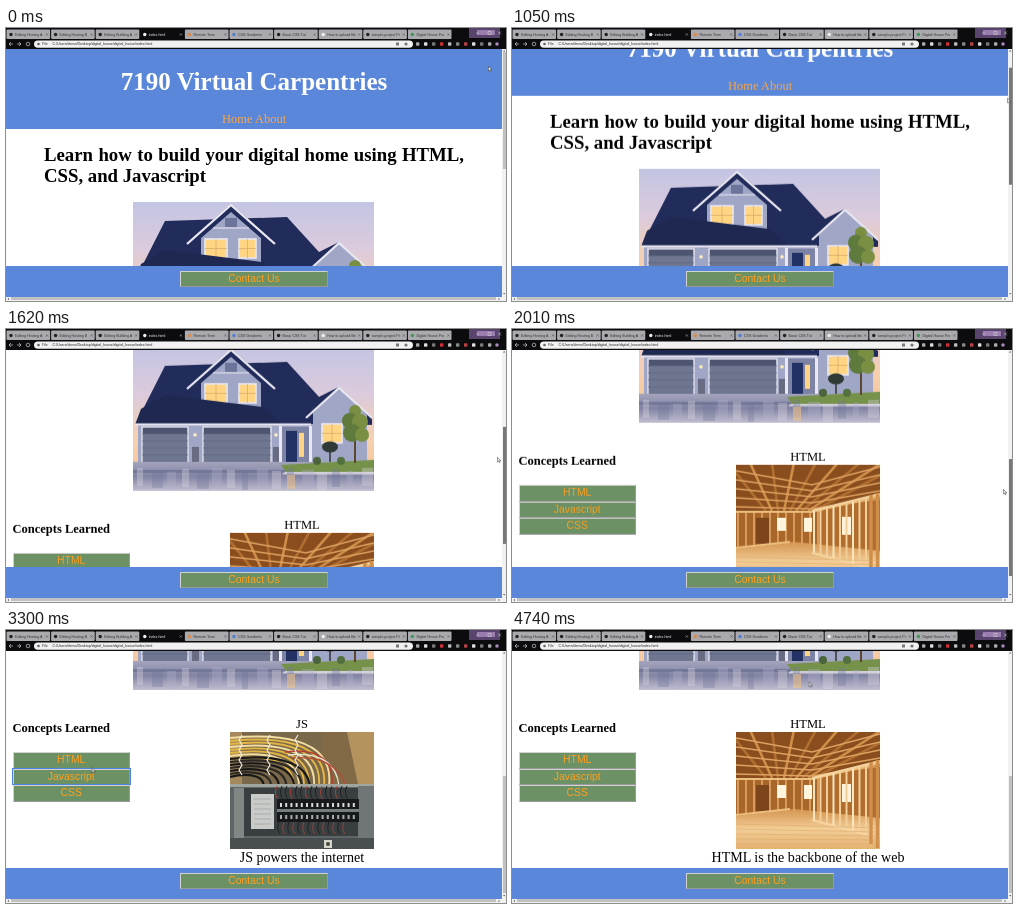
An HTML page for the animation above (4.77 s loop, 500 by 273 pixels).

```html
<!DOCTYPE html>
<html lang="en">
<head>
<meta charset="utf-8">
<title>Scrolling web page</title>
<style>
  html, body { margin: 0; width: 100%; height: 100%; overflow: hidden; background: #fff; }
  #stage { position: relative; width: 500px; height: 273px; overflow: hidden; background: #fff;
    font: 12.5px/1 "Liberation Serif", "Times New Roman", serif; color: #000; }
  #stage * { box-sizing: border-box; }
  #stage div, #stage svg, h1, h2, h3, p, button { position: absolute; margin: 0; }
  h1, h3, p { white-space: nowrap; line-height: 1; font-size: 12.5px; }
  #page { left: 0; top: .5px; width: 496px; height: 526px; }
  header { position: absolute; top: 0; width: 496px; height: 100px; background: #5b87da; }
  h1, nav { position: absolute; width: 100%; text-align: center; }
  h1 { top: 40px; font-size: 25px; color: #fff; }
  nav { top: 84.5px; color: #ffa53c; }
  h2 { left: 38px; top: 115px; width: 420px; font-size: 18.75px; line-height: 21.5px; text-align: justify; }
  h3 { left: 6.5px; top: 349.5px; }
  .panel { left: 196px; top: 345.5px; width: 200px; height: 150px; }
  .panel p { width: 100%; text-align: center; }
  .panel p:last-child { top: 132px; font-size: 14.06px; }
  .panel svg { left: 28px; top: 13.5px; }
  button { padding: .8px 0 0; background: #6b9164; color: #ffa020; border: 1.6px solid;
    border-color: #d2d2d2 #999 #999 #d2d2d2;
    font: 10.42px/1 "Liberation Sans", Arial, sans-serif; text-align: center; }
  #page button { left: 6.5px; width: 117.5px; height: 16.5px; }
  #ring { left: 6px; top: 395.5px; width: 118.5px; height: 17px; border: 1px solid #4b85dc; }
  footer { position: absolute; top: 237.5px; width: 496px; height: 31px; background: #5b87da; }
  footer button { left: 174px; top: 5.8px; width: 148px; height: 16px; }
  .track { background: #f1f1f1; }
  .track div { background: #c1c1c1; }
  #chrome { width: 500px; height: 21px; background: #0c0b0e;
    font: 3.6px/9px "Liberation Sans", Arial, sans-serif; white-space: nowrap; overflow: hidden; }
  #cursor { left: 0; top: 0; }
</style>
</head>
<body>
<div id="stage">
  <div id="page">
    <header><h1>7190 Virtual Carpentries</h1><nav>Home About</nav></header>
    <h2>Learn how to build your digital home using HTML, CSS, and Javascript</h2>
    <svg id="house" width="241" height="144" style="left:127px;top:173px"></svg>
    <h3>Concepts Learned</h3>
    <button style="top:379.5px">HTML</button>
    <button style="top:396px">Javascript</button>
    <button style="top:412.5px">CSS</button>
    <div id="ring"></div>
    <div class="panel" id="html"><p>HTML</p><svg width="144" height="117"></svg><p>HTML is the backbone of the web</p></div>
    <div class="panel" id="js"><p>JS</p><svg width="144" height="117"></svg><p>JS powers the internet</p></div>
  </div>
  <footer><button>Contact Us</button></footer>
  <div class="track" style="left:496px;top:21px;width:4px;height:252px">
    <div id="thumb" style="left:.5px;top:3.3px;width:3.5px;height:117px"></div>
  </div>
  <div class="track" style="left:0;top:268.5px;width:496px;height:4.5px">
    <div style="left:5px;top:.6px;width:485px;height:3.4px"></div>
  </div>
  <svg width="500" height="273" fill="#666"><path d="M3 269.8v2.4l-1.5-1.2ZM492.5 269.8v2.4l1.5-1.2ZM497 265h2.4l-1.2 1.5ZM497 23.5h2.4l-1.2-1.5Z"/></svg>
  <div id="chrome"></div>
  <svg id="cursor" width="6" height="8"><path d="M.4.4V5L1.5 4l.8 1.7.8-.4L2.4 3.6H3.8Z" fill="#fff" stroke="#222" stroke-width=".5"/></svg>
</div>
<script>
const LOOP = 4770;
const $ = q => document.querySelector(q);
const rep = (n, f) => Array.from({ length: n }, (_, i) => f(i)).join('');
const rect = (x, y, w, h, fill, more = '') =>
  `<rect x="${x}" y="${y}" width="${w}" height="${h}" fill="${fill}" ${more}/>`;
const poly = (points, fill) => `<polygon points="${points}" fill="${fill}"/>`;
const line = (d, color, width = 1) =>
  `<path d="${d}" fill="none" stroke="${color}" stroke-width="${width}"/>`;
const dot = (x, y, r, fill) => `<circle cx="${x}" cy="${y}" r="${r}" fill="${fill}"/>`;
const fade = (id, ...colors) => `<linearGradient id="${id}" x2="0" y2="1">` +
  colors.map((c, i) => `<stop offset="${i / (colors.length - 1)}" stop-color="${c}"/>`).join('') +
  '</linearGradient>';

function drawHouse() {
  const navy = '#222c5a', wall = '#a0a6c6', trim = '#e9e8f2', glow = '#ffd583';
  const pane = (x, y, w, h) => rect(x, y, w, h, glow, `stroke="${trim}" stroke-width="1.6"`) +
    line(`M${x + w / 2} ${y}v${h}M${x} ${y + h / 2}h${w}`, '#d6a96b', .7);
  const garage = (x, w) => rect(x, 80, w, 36, '#6f7690', `stroke="${trim}" stroke-width="1.3"`) +
    rect(x + 1, 81, w - 2, 6, '#4d546f') +
    rep(4, i => line(`M${x} ${87 + i * 7}h${w}`, '#5f6681', .7));
  return fade('sky', '#c3c5e4', '#dccbdc', '#f7d0ae', '#f3bd8c') + fade('road', '#a5a4bd', '#8184a3', '#c3bfd2') +
    rect(0, 0, 241, 144, 'url(#sky)') +
    poly('32,19 154,15 186,50 206,40 239,72 239,78 2,78', navy) +
    poly('98,3 128,30 128,62 68,62 68,30', wall) +
    poly('98,2 143,41 137,44 98,10 59,44 53,41', navy) +
    line('M54 42L98 3L142 42', trim, 2.3) + line('M66 61.5H130', trim, 1.6) +
    line('M80 26H116', trim, 1.2) + rect(92, 16, 12, 9, '#6d749b') +
    pane(72, 37, 22, 19) + pane(106, 37, 17, 19) +
    poly('32,48 146,62 154,78 2,78 8,62', '#1f2850') + poly('128,58 182,58 178,78 150,78', navy) +
    poly('206,41 234,68 234,116 180,116 180,66', wall) +
    line('M173 71L206 41L239 71', trim, 2.2) +
    rect(5, 77, 175, 40, wall) + line('M2 77.5H178', trim, 1.8) +
    garage(9, 46) + garage(70, 68) +
    rect(59, 100, 7, 17, '#686b82') + rect(140, 100, 7, 17, '#686b82') +
    rect(148, 80, 30, 36, '#7d83a5') + rect(153, 84, 11, 31, '#223264') +
    rect(166, 86, 5, 24, glow) + rect(146, 79, 3, 37, trim) + rect(176, 79, 3, 37, trim) +
    pane(189, 77, 20, 19) + dot(62, 88, 1.8, '#fff0bd') + dot(143, 88, 1.8, '#fff0bd') +
    rect(0, 115, 241, 29, 'url(#road)') +
    poly('148,118 241,113 241,126 153,125', '#76924a') + rect(150, 125, 91, 2.5, '#cfccd8') +
    line('M222 116V82', '#5b4630', 2) +
    [[222, 64, 6], [217, 74, 8], [227, 75, 8], [219, 86, 9], [229, 88, 7]]
      .map(([x, y, r], i) => dot(x, y, r, i % 2 ? '#5f7a3d' : '#7b8f43')).join('') +
    line('M197 115V102', '#333', 1.5) + '<ellipse cx="197" cy="100" rx="8" ry="5.5" fill="#2f3a36"/>' +
    dot(184, 114, 4, '#4b643c') + dot(208, 114, 4, '#53703f') +
    rect(0, 123, 152, 3, '#5c6287', 'opacity=".5"') +
    rep(16, i => rect(4 + i * 15, 121 + i * 7 % 5, 6 + i * 5 % 7, 18,
      ['#dcd6e3', '#6f7598', '#b1aecb'][i % 3], 'opacity=".35"')) +
    rect(154, 128, 8, 14, '#f0c38c', 'opacity=".6"');
}

function drawFrame() {
  return fade('floor', '#d3944f', '#f3cd97', '#e4b171') +
    rect(0, 0, 144, 117, '#b06d2e') +
    poly('0,0 144,0 144,30 76,46 0,48', '#8a4d1e') +
    rep(9, i => line(`M${-8 + i * 22} -2L${30 + i * 6} 46`, i % 2 ? '#cf8f49' : '#b06f31', 2.6)) +
    rep(5, i => line(`M0 ${6 + i * 9}L76 ${20 + i * 6}L144 ${2 + i * 8}`, '#dda260', 1.6)) +
    rect(0, 47, 82, 36, '#a9662b') +
    poly('0,84 58,77 144,86 144,117 0,117', 'url(#floor)') +
    rep(11, i => line(`M${2 + i * 8} 46V${83 - i % 3}`, '#dda561', 1.7)) +
    rect(20, 53, 13, 26, '#7d451b') + rect(41, 53, 9, 13, '#fff4dc') + rect(68, 53, 8, 14, '#fff4dc') +
    rect(106, 52, 9, 18, '#fff2d8') + line('M0 47L76 47L144 31M0 83L54 77', '#ecbf7e', 2.2) +
    rep(9, i => line(`M${78 + i * 6.5} ${45 - i * 1.6}V${88 + i * 1.8}`, i % 3 ? '#f2cf98' : '#fbe5bd', 2)) +
    line('M76 88L132 103M76 46L144 29', '#f5d5a1', 2) +
    line('M135 30V112M141.5 28V116', '#cf8e4a', 3.4) +
    rep(5, i => line(`M0 ${92 + i * 5}L144 ${96 + i * 4}`, '#d9a464', .5));
}

function drawPanel() {
  const cable = (x, y, w, h, color, width) => line(`M0 ${y}C${w * .4} ${y - 4} ${w} ${y - 3} ${x} ${h}`, color, width);
  return rect(0, 0, 144, 117, '#796849') +
    rect(0, 0, 12, 52, '#a5885b') + rect(92, 0, 52, 52, '#836a47') + poly('117,0 144,0 144,52 128,52', '#b4935f') +
    rep(8, i => cable(99 - i * 5, 6 + i * 3, 105 - i * 6, 54, i % 3 ? '#e2b544' : '#f4dda0', 1.9)) +
    rep(7, i => cable(80 - i * 8, 27 + i * 3, 82 - i * 7, 60, i % 2 ? '#2c2925' : '#171717', 2.2)) +
    rep(3, i => line(`M${55 + i * 3} ${20 + i * 3}Q105 ${14 + i * 4} ${102 + i * 7} 54`, ['#ba3c30', '#ece7d8', '#b64a39'][i], 1.3)) +
    rep(3, i => line(`M${12 + i * 28} 3` + rep(8, k => `l${k % 2 ? 3 : -3} 5`), '#eee9dc', 1.2)) +
    rect(0, 52, 144, 65, '#5e6566') + rect(0, 52, 144, 3, '#a1a5a0') +
    rect(14, 56, 114, 48, '#393e40') + rect(4, 56, 10, 51, '#818785') + rect(128, 54, 16, 63, '#707675') +
    rep(15, i => line(`M${47 + i * 5} 54Q${43 + i * 5} 62 ${49 + i * 5} 69`, i % 3 ? '#20201f' : '#9d443b', 1)) +
    rep(14, i => line(`M${49 + i * 5} 90Q${46 + i * 5} 97 ${50 + i * 5} 102`, i % 2 ? '#8c4940' : '#222', 1)) +
    rect(21, 62, 23, 35, '#c8cbc8') + rep(6, i => line(`M24 ${67 + i * 5}h17`, '#9ea3a2', .7)) +
    rect(47, 67, 82, 23, '#171a1d') + rect(47, 77, 82, 3, '#777c7d') +
    rep(15, i => rect(50 + i * 5.2, 71, 2, 4, '#d8d9d2') + rect(50 + i * 5.2, 83, 2, 4, '#a9acaa')) +
    rect(0, 106, 144, 11, '#494f50') + rect(94, 108, 8, 8, '#d7d5c8') + dot(98, 112, 2, '#444');
}

function drawChrome() {
  const tabs = ['Editing Hosting A', 'Editing Hosting B', 'Editing Building A', 'index.html', 'Remote Term',
    'CSS Gradients', 'Basic CSS Tut', 'How to upload file', 'sample-project Pr', 'Digital House Pro'];
  const marks = ['#222', '#222', '#222', '#eee', '#d98a4a', '#4f7fd8', '#222', '#eee', '#222', '#3d9a55'];
  const tools = ['#aaa', '#ddd', '#777', '#cf3037', '#bbb', '#888', '#b84345', '#ddd', '#777', '#aaa'];
  const text = (x, y, s, fill = '#333') => `<text x="${x}" y="${y}" fill="${fill}">${s}</text>`;
  return '<svg width="500" height="21">' +
    tabs.map((s, i) => {
      const x = i * 44.6, on = i === 3;
      return rect(x + .5, 1.5, 43.6, 9.5, on ? '#0c0b0e' : '#a9a9ae', 'rx="1"') +
        dot(x + 5, 6.5, 1.7, marks[i]) + text(x + 9, 7.8, s, on ? '#fff' : '#333') +
        line(`M${x + 40} 5.5l2 2m0-2l-2 2`, on ? '#ccc' : '#444', .5);
    }).join('') +
    rect(463, 0, 31, 10, '#58446d') + rect(471, 2, 18, 5, '#9a7cae') +
    line('M470 5h3M482 3.5h3v3h-3ZM492 3.5l3 3m0-3l-3 3', '#ddd', .5) +
    line('M7 16H3l2-2M3 16l2 2M11 16h4l-2-2M15 16l-2 2', '#ccc', .7) +
    '<circle cx="22" cy="16" r="1.8" fill="none" stroke="#ccc" stroke-width=".7"/>' +
    rect(28, 12.4, 379, 7.4, '#f1f1f2', 'rx="3.7"') + dot(32.5, 16, 1.3, '#666') + text(36, 17.3, 'File') +
    text(46.5, 17.3, 'C:/Users/demo/Desktop/digital_house/digital_house/index.html', '#222') +
    rect(390, 14.5, 3, 3, '#777') + dot(400, 16, 1.6, '#777') +
    tools.map((c, i) => rect(410 + i * 8, 14.3, 3.4, 3.4, c, 'rx=".8"')).join('') +
    dot(491, 16, 1.8, '#aa87b7') + '</svg>';
}

$('#house').innerHTML = drawHouse();
$('#html svg').innerHTML = drawFrame();
$('#js svg').innerHTML = drawPanel();
$('#chrome').innerHTML = drawChrome();

const start = document.timeline.currentTime;
function play(target, steps, style, easing = 'linear') {
  const keys = steps.map(([t, ...v]) => ({ offset: t / LOOP, easing, ...style(...v) }));
  keys.push({ ...keys[keys.length - 1], offset: 1 });
  $(target).animate(keys, { duration: LOOP, iterations: Infinity }).startTime = start;
}

const move = (x, y) => ({ transform: `translate(${x}px, ${y}px)` });
const THUMB_RATIO = 0.473;
const scroll = [[0, 0], [570, 0], [810, 9], [1050, 33], [1350, 95], [1620, 156],
  [1830, 195], [2010, 224], [2160, 258]];
// While dragging, the pointer follows the thumb.
const dragX = { 570: 495, 810: 495, 1050: 495, 1350: 493, 1620: 491, 1830: 491, 2010: 491, 2160: 490 };
const drag = scroll.slice(1).map(([t, y]) => [t, dragX[t], 54 + y * THUMB_RATIO]);
const pointer = [[0, 482, 38], [180, 482, 38], [300, 490, 45], [420, 495, 54], ...drag,
  [2340, 487.5, 195], [2490, 310, 172], [2640, 95, 142], [2730, 95, 142], [2940, 86, 139],
  [3300, 85.5, 137.5], [3780, 84, 139], [4290, 76, 130], [4380, 76, 130], [4560, 165, 96], [4740, 296.5, 51.5]];

play('#page', scroll, y => move(0, -y));
play('#thumb', scroll, y => move(0, y * THUMB_RATIO));
play('#cursor', pointer, move);

const show = opacity => ({ opacity });
play('#html', [[0, 1], [2940, 0], [4380, 1]], show, 'step-end');
play('#js', [[0, 0], [2940, 1], [4380, 0]], show, 'step-end');
play('#ring', [[0, 0], [2940, 1], [4380, 0]], show, 'step-end');
play('#thumb', [[0, '#c1c1c1'], [570, '#787878'], [2400, '#c1c1c1']], backgroundColor => ({ backgroundColor }), 'step-end');
</script>
</body>
</html>
```
